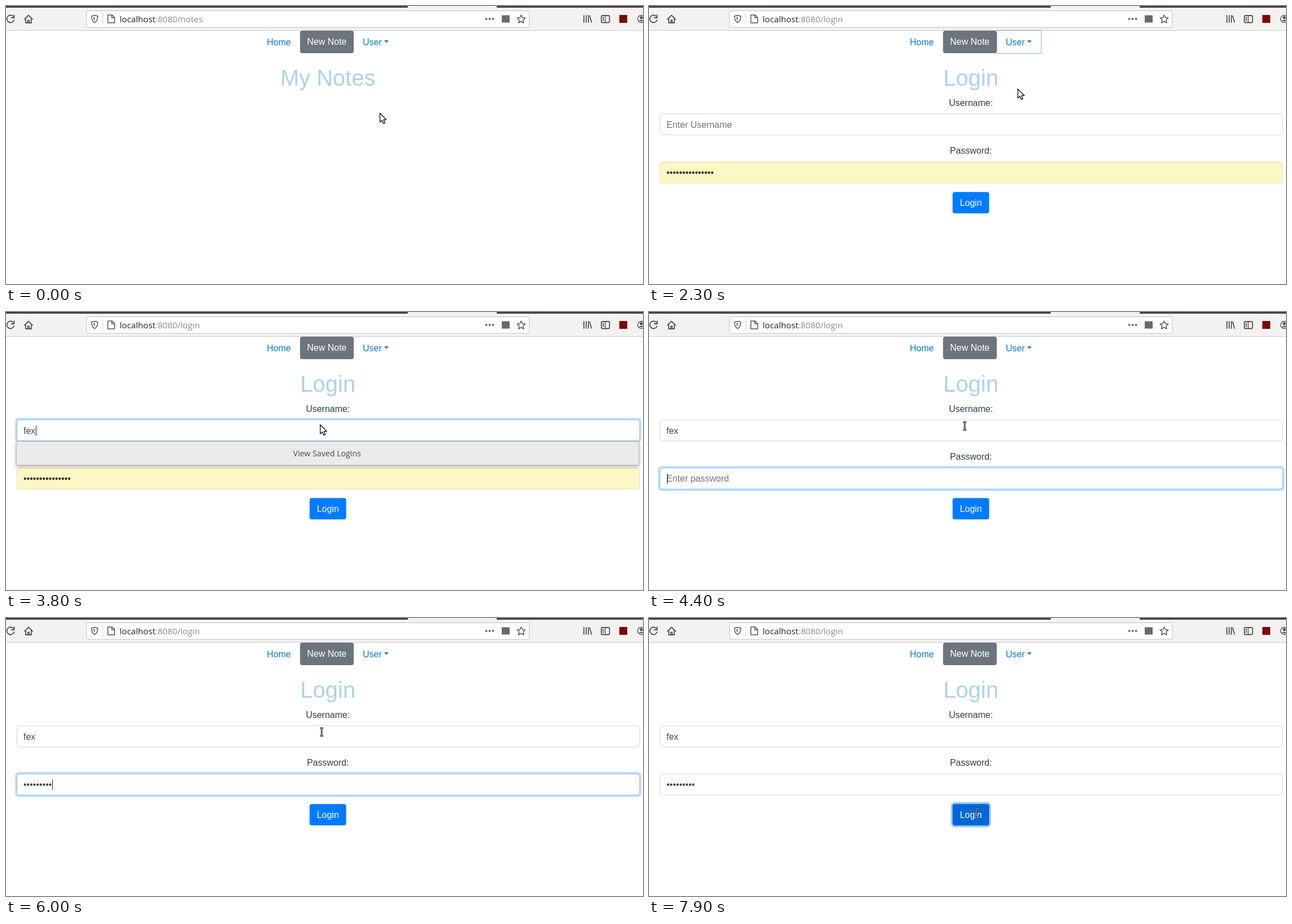
An HTML page for the animation above (8000 ms loop, 1132x495 px).

```html
<!DOCTYPE html>
<html lang="en">
<head>
<meta charset="utf-8">
<title>Notes login</title>
<style>
  html, body { margin: 0; width: 100%; height: 100%; overflow: hidden; background: #fff; }
  svg { display: block; width: 1132px; height: 495px; font: 16px "Liberation Sans", Arial, sans-serif; }
  .ui { font-family: "Open Sans", "Noto Sans", sans-serif; }
  .mid { text-anchor: middle; }
  .label { fill: #2c3e50; text-anchor: middle; }
  .icon { fill: none; stroke: #55534f; stroke-width: 1.8; stroke-linecap: round; stroke-linejoin: round; }
  .glow { fill: none; stroke: #007bff; stroke-opacity: .25; stroke-width: 3.4; }
  .caret { stroke: #111; stroke-width: 1; }
  .popup { filter: drop-shadow(0 2px 3px rgba(0, 0, 0, .35)); }
</style>
</head>
<body>
<svg viewBox="0 0 1132 495">
  <!-- browser bar -->
  <rect width="1132" height="43" fill="#f3f2f0"/>
  <path d="M0 0H714V3H0ZM872 0H1132V3H872Z" fill="#47423e"/>
  <path d="M0 43.5H1132" stroke="#cac8c5"/>
  <rect x="143" y="8.5" width="787" height="29.5" rx="3" fill="#fff" stroke="#c3bfba"/>
  <path d="M172 12V34" stroke="#d0cecb"/>
  <g class="icon">
    <path d="M13 18.5A6.6 6.6 0 1 0 14.3 25M14.5 16V21H9.5"/>
    <path d="M33 23.5L40 16.5L47 23.5M35 23V30H45V23M38.7 30V25.5H41.3V30"/>
    <path d="M157.500 16.500L163 18C163 24 161.500 27.500 157.500 29.500C153.500 27.500 152 24 152 18Z" stroke-width="1.500"/>
    <path d="M157.500 19.500V26C156 24.500 155.300 22.500 155.300 20Z" fill="#55534f" stroke="none"/>
    <path d="M181 16H188.500L193 20.500V30H181ZM188 16V21H193" stroke-width="1.500"/>
    <path d="M915.500 16L917.700 20.800L922.800 21.300L919 24.800L920.100 30L915.500 27.300L910.900 30L912 24.800L908.200 21.300L913.300 20.800Z" stroke-width="1.500"/>
    <path d="M1027 17V29M1031 17V29M1035 17V29M1037.200 17.500L1040.500 29"/>
    <rect x="1058" y="17" width="14.500" height="12.500" rx="2"/>
    <path d="M1065 17V29M1060.500 20.500H1062.500M1060.500 23H1062.500M1060.500 25.500H1062.500" stroke-width="1.300"/>
    <circle cx="1129" cy="23" r="6.500" stroke-width="1.400"/>
    <path d="M1129 18.500a2.300 2.300 0 0 1 0 4.600a2.300 2.300 0 0 1 0-4.600M1125 27q4-4 8 0" fill="#55534f" stroke-width="1"/>
  </g>
  <g fill="#6b6965">
    <circle cx="853.500" cy="23" r="2"/><circle cx="859.500" cy="23" r="2"/><circle cx="865.500" cy="23" r="2"/>
    <rect x="881" y="16.500" width="14" height="13"/>
  </g>
  <rect x="1090" y="16" width="14" height="14" fill="#7c0508"/>
  <text class="ui" x="202" y="29" font-size="15.2" fill="#8b8986"><tspan fill="#22211f">localhost</tspan>:8080/<tspan id="path">notes</tspan></text>

  <!-- navigation -->
  <text x="463.500" y="70" fill="#0a78c6">Home</text>
  <rect x="522.500" y="44" width="95.500" height="40" rx="4" fill="#6c757d"/>
  <text x="535" y="69" fill="#fff">New Note</text>
  <g id="user" fill="#0a78c6">
    <text x="634" y="70">User</text>
    <path d="M671.800 61.300H680.200L676 65.500Z"/>
  </g>
  <rect id="outline" x="618" y="43.500" width="79" height="41" fill="none" stroke="#0a66b8" stroke-dasharray="1 1"/>
  <text id="title" class="mid" x="572" y="142" font-size="40" fill="#abd5e4">My Notes</text>

  <!-- login form -->
  <g id="form">
    <text class="label" x="572" y="178">Username:</text>
    <text class="label" x="572" y="263">Password:</text>
    <rect id="nameGlow" class="glow" x="17.500" y="190.300" width="1110" height="41" rx="5"/>
    <rect id="nameBox" x="19.500" y="192" width="1106.500" height="37.500" rx="4" fill="#fff"/>
    <text id="name" x="31" y="217"></text>
    <path id="nameCaret" class="caret"/>
    <rect id="passGlow" class="glow" x="17.500" y="276" width="1110" height="41" rx="5"/>
    <rect id="passBox" x="19.500" y="277.700" width="1106.500" height="37.500" rx="4"/>
    <text id="pass" x="31" y="302"></text>
    <path id="passCaret" class="caret"/>
    <rect id="btnGlow" x="538.200" y="329.700" width="67.600" height="41" rx="5" fill="none" stroke="#268fff" stroke-opacity=".5" stroke-width="3.400"/>
    <rect id="btn" x="539.500" y="331.300" width="65" height="38" rx="4"/>
    <text class="mid" x="572" y="356" fill="#fff">Login</text>
  </g>

  <g id="menu" fill="#212529">
    <rect x="537.500" y="86.500" width="158" height="81" rx="4" fill="#fff" stroke="#d9d9d9"/>
    <rect id="hover" x="538" width="157" height="32" fill="#f3f5f7"/>
    <text x="562" y="117">Register</text>
    <text x="562" y="149">Login</text>
  </g>

  <g id="popup" class="popup">
    <rect id="sheet" x="18.500" width="1106" fill="#ebebeb" stroke="#bdbdbd"/>
    <text id="saved" class="ui mid" x="570.500" font-size="14.200" fill="#4a4a4a">View Saved Logins</text>
  </g>

  <g id="arrow">
    <path d="M.5 .8V17L4.200 13.600L6.800 19.400L9.500 18.200L7 12.500H12Z" fill="#fff" stroke="#1a1a1a" stroke-width="1.400" stroke-linejoin="round"/>
  </g>
  <g id="beam" fill="none">
    <path d="M-3 -6.800H-1L0 -6L1 -6.800H3M0 -6V6M-3 6.800H-1L0 6L1 6.800H3" stroke="#1d1d1d" stroke-width="2.800"/>
    <path d="M-3 -6.800H-1L0 -6L1 -6.800H3M0 -6V6M-3 6.800H-1L0 6L1 6.800H3" stroke="#ddd" stroke-width=".8"/>
  </g>
  <g id="hand">
    <path d="M-2 1.500Q-2 0 -.6 0T.9 1.500V6Q2.500 5 3.600 6.500Q5.200 5.700 6.200 7.200Q7.800 6.700 8.600 8.200Q9.500 8.500 9.500 10V12.500Q9.300 14.500 8.300 16V18H0V16.200L-5.300 11Q-6 9.300 -4.700 9Q-3.700 8.800 -2 10.500Z" fill="#fff" stroke="#1a1a1a" stroke-width="1.300" stroke-linejoin="round"/>
    <path d="M.9 6V9.500M3.600 6.800V9.700M6.200 7.500V10" stroke="#1a1a1a"/>
  </g>
</svg>
<script>
const LOOP = 8000, STEP = 100;
const el = {};
document.querySelectorAll("[id]").forEach(e => el[e.id] = e);

// step, pointer, x, y
const pointer = [
  [0, "arrow", 664, 190], [1, "arrow", 664, 191], [2, "arrow", 664, 192],
  [6, "arrow", 674, 181], [7, "arrow", 699, 152], [8, "arrow", 713, 122],
  [9, "arrow", 703, 94], [10, "hand", 681, 75], [11, "hand", 667, 69],
  [16, "hand", 673, 78], [18, "hand", 667, 112], [19, "hand", 659, 144],
  [21, "arrow", 657, 146], [23, "arrow", 655, 147], [24, "arrow", 650, 152],
  [25, "arrow", 632, 166], [26, "arrow", 604, 182], [27, "beam", 575, 199],
  [28, "beam", 559, 205], [29, "beam", 554, 206], [30, "beam", 561, 203],
  [35, "arrow", 558, 200], [39, "beam", 561, 203], [47, "arrow", 558, 200],
  [48, "beam", 561, 203], [64, "beam", 561, 200], [65, "beam", 563, 191],
  [66, "beam", 572, 215], [67, "arrow", 580, 262], [68, "arrow", 582, 315],
  [69, "hand", 582, 339], [79, "beam", 582, 346]
];
const typed = [[0, ""], [35, "f"], [37, "fe"], [38, "fex"]];
const path = [[0, "notes"], [21, "login"]];
const dots = [[0, 0], [22, 15], [44, 0], [48, 1], [49, 2], [51, 3], [52, 4], [53, 5], [54, 6], [57, 7], [58, 8], [60, 9]];
const nameFocus = [[0, 0], [28, .6], [29, 1], [39, 0]];
const passFocus = [[0, 0], [39, .6], [40, 1], [71, .4], [72, 0]];
const btnFocus = [[0, 0], [72, .6], [73, 1]];
const btnFill = [[0, "#007bff"], [69, "#0074ee"], [70, "#0069d9"], [72, "#0062cc"], [75, "#0067d6"]];
// step, top, height
const popup = [[0, 0, 0], [35, 231, 12], [36, 231, 42], [39, 0, 0], [45, 317, 13], [47, 317, 84], [48, 0, 0]];

const at = (table, n) => table.findLast(row => row[0] <= n);
const value = (table, n) => at(table, n)[1];
const show = (e, on) => e.setAttribute("display", on ? "inline" : "none");
const set = (e, attrs) => { for (const k in attrs) e.setAttribute(k, attrs[k]); };

function field(key, text, hint, focus, caretX, caretOn, top) {
  el[key].textContent = text || hint;
  set(el[key], { fill: text ? "#444b52" : "#6c757d" });
  set(el[key + "Glow"], { opacity: focus });
  set(el[key + "Box"], { stroke: focus > .5 ? "#80bdff" : "#ced4da" });
  set(el[key + "Caret"], { d: `M${Math.round(caretX) + .5} ${top}v18.500` });
  show(el[key + "Caret"], caretOn);
}

function render(n) {
  const login = n >= 21;
  el.path.textContent = value(path, n);
  el.title.textContent = login ? "Login" : "My Notes";
  show(el.form, login);
  show(el.outline, n >= 21 && n < 28);
  set(el.user, { fill: n >= 10 && n < 18 ? "#0056b3" : "#0a78c6" });

  show(el.menu, n >= 14 && n < 21);
  show(el.hover, n >= 18);
  set(el.hover, { y: n < 19 ? 95 : 127 });

  const name = value(typed, n), count = value(dots, n);
  const nameWidth = { "": 0, f: 4.4, fe: 13.3, fex: 21.3 }[name];
  field("name", name, "Enter Username", value(nameFocus, n), 31.5 + nameWidth, n >= 28 && n < 39, 202);
  field("pass", "•".repeat(count), "Enter password", value(passFocus, n), 31.5 + 5.6 * count, n >= 44 && n < 62, 287.5);
  const filled = n >= 22 && n < 44;
  set(el.passBox, { fill: filled ? "#fbf8c3" : "#fff" });
  if (filled) set(el.pass, { fill: "#33312a" });
  if (filled && n < 39) set(el.passBox, { stroke: "#e4e0b4" });

  set(el.btn, { fill: value(btnFill, n) });
  set(el.btnGlow, { opacity: value(btnFocus, n) });

  const [, top, height] = at(popup, n);
  show(el.popup, height);
  set(el.sheet, { y: top - .5, height });
  show(el.saved, height > 20);
  set(el.saved, { y: top + height - 16 });

  const [, kind, x, y] = at(pointer, n);
  for (const k of ["arrow", "beam", "hand"]) show(el[k], k === kind);
  set(el[kind], { transform: `translate(${x} ${y})` });
}

const start = performance.now();
let last = -1;
function tick() {
  const n = Math.floor((performance.now() - start) % LOOP / STEP);
  if (n !== last) render(last = n);
  requestAnimationFrame(tick);
}
tick();
</script>
</body>
</html>
```
